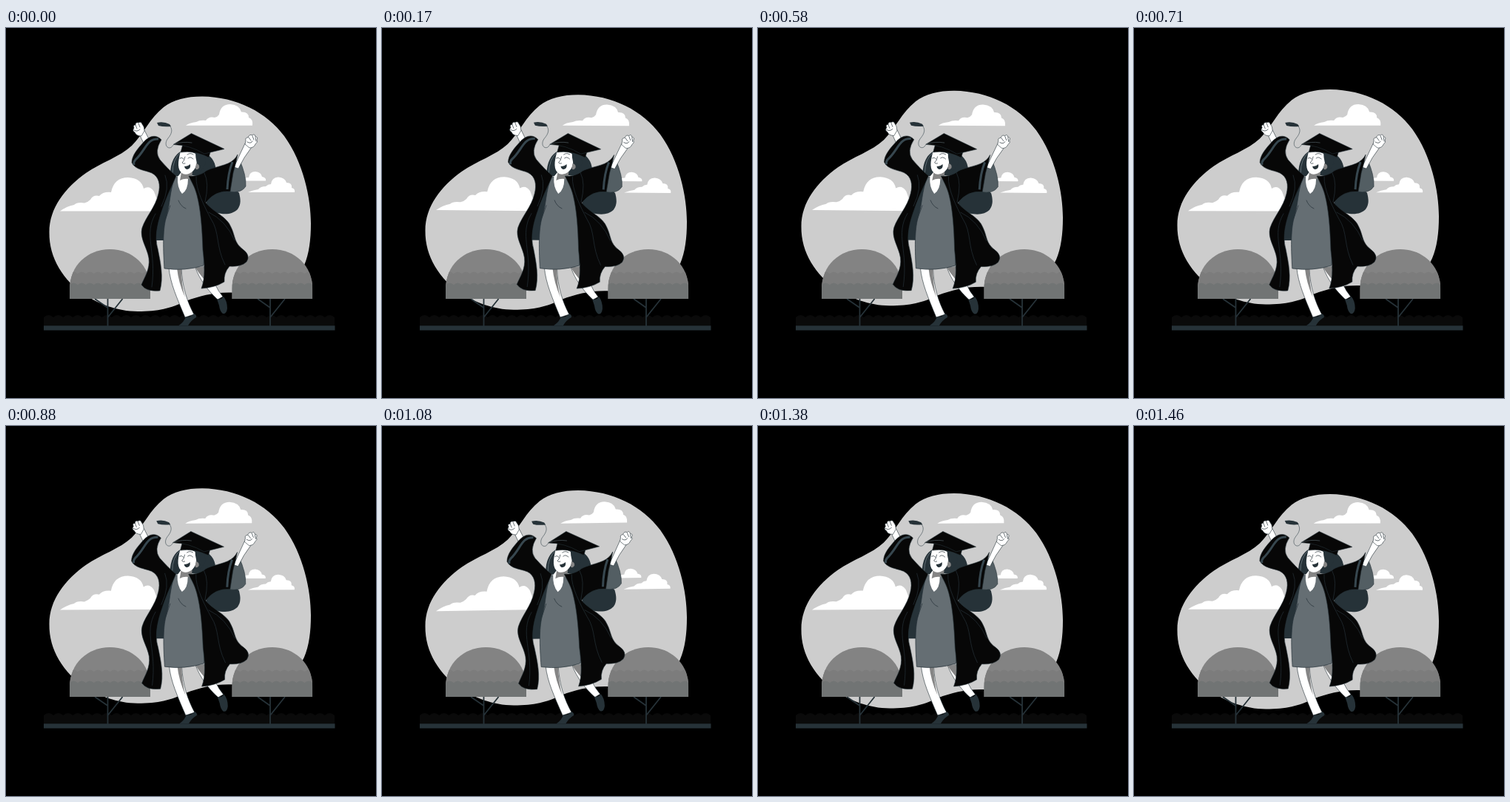
These frames come from a looping animation (500x500 px, 1500 ms). An HTML page:

```html
<!DOCTYPE html>
<html lang="en">
<head>
<meta charset="utf-8">
<title>Graduation jump</title>
<style>
html, body { margin: 0; height: 100%; overflow: hidden; background: #000; }
svg { display: block; width: 100vw; height: 100vh; }
.ink { fill: #263238; }
.gown { fill: #070707; stroke: #263238; stroke-width: .6; }
.line { fill: none; stroke: #263238; stroke-width: .7; stroke-linecap: round; stroke-linejoin: round; }
.skin { fill: #fff; stroke: #263238; stroke-width: .6; stroke-linejoin: round; }
.shade { fill: #858585; }
.trim { fill: none; stroke: #37474f; stroke-width: 3; }
</style>
</head>
<body>
<svg viewBox="0 0 500 500">
  <defs>
    <clipPath id="dome"><path d="M86 366V353C86 321 110 299 140.500 299S195 321 195 353V366Z"/></clipPath>
    <g id="crown" clip-path="url(#dome)">
      <path fill="#838383" d="M86 299H195V366H86Z"/>
      <path id="band1" fill="#7c7c7c"/>
      <path id="band2" fill="#717474"/>
    </g>
  </defs>

  <path id="blob" fill="#cdcdcd" d="M265 92.500C312 93 352 114 376 146C402 182 412 230 412 264C412 309 402 340 370 354C343 361 322 357.500 304 357.500C280 357 262 362 243 369C222 379 206 383 178 383C150 383 124 372 107 361C78 342 58 311 58.500 276C58.500 243 80 216 108 196C128 182 154 174 170 159C186 143 194 122 213 107C226 97 244 92.500 265 92.500Z"/>

  <g class="sway" fill="#fff">
    <path d="M243 131.700Q248 128 257 127Q262 124 270 125Q274 119 282 121Q286 120 288 117Q290 103 303 103Q316 104 318 113.500Q328 113 328 121Q334 123 333 131.700Z"/>
    <path d="M73 247.500Q82 241 92 239Q96 235 106 236.500Q111 235 114 232Q118 225 126 227Q131 221 142 222Q146 202 165 202Q183 203 186 217Q194 212 200 221L210 247.500Z"/>
    <path d="M327 222Q334 219 341 218Q344 214 351 214Q354 211 358 211Q359 202 368 201.500Q377 202 379 209Q387 209 386 216Q391 217 390 222Z"/>
    <path d="M318 206.500Q322 202 328 202Q329 194 337 194Q345 195 346 201Q352 202 351 206.500Z"/>
  </g>

  <path id="hedge" fill="#0a0a0a"/>
  <path class="ink" d="M51 402.300H444.500V408.600H51Z"/>
  <path fill="none" stroke="#263238" stroke-width="1.800" d="M137.500 366V403M120 366L137.500 378M157.500 366L137.500 391M357 366V403M340 366L357 378M377 366L357 391"/>
  <use href="#crown"/>
  <use href="#crown" x="219.300"/>

  <g class="sway">
    <!-- hair and lining behind the body -->
    <path class="ink" d="M238 166C228 170 222 182 222 198Q231 203 240 198L264 200C276 199 285 197 283 187C281 176 273 170 262 165Z"/>
    <path class="ink" d="M272 224C288 216 312 217 315 223C317 231 318 238 313 245C304 254 288 253 270 244Z"/>
    <path class="line" style="stroke:#78858b" d="M236 168Q225 177 225 196"/>
    <path class="ink" d="M228 203L208 243L200 287H215L228 235Z"/>

    <!-- legs -->
    <path class="skin" d="M256 324C262 340 272 354 286 367L293 363Q281 349 274 322Z"/>
    <path class="shade" d="M256 324Q264 337 278 350L281 348L272 322Z"/>
    <path class="ink" d="M285 366Q290 368 294 363Q299 369 299 379Q298 387 293 386Q289 383 288 375Z"/>
    <path class="skin" d="M220 324C222 345 231 365 242 391L254 387C245 370 238 350 237 324Z"/>
    <path class="shade" d="M231 324Q233 344 242 364Q237 347 237 324Z"/>
    <path class="ink" d="M233 402.300Q241 397 243 390Q249 392 254 386Q258 388 257 391Q250 395 246 402.300Z"/>

    <!-- dress, neck and chest -->
    <path fill="#656e73" stroke="#263238" stroke-width=".7" d="M228 202C221 222 222 237 217 254C212 270 212 293 214 325Q241 329 267 321L270 270L262 230L251 200Z"/>
    <path fill="#fff" d="M232 201L239 192L249 194L246 204Q246 219 238 224Q231 216 232 201Z"/>
    <path class="shade" d="M237 195Q243 200 252 193L251 205Q242 202 235 206Z"/>
    <path class="line" d="M233 233Q236 241 243 244M222 240Q218 252 214 262"/>

    <!-- arms -->
    <path class="skin" d="M180 143L187 158L196 156L187 138Z"/>
    <path class="skin" d="M173 135Q171 131 175 131Q175 127 179 128Q183 126 184 130Q187 133 187 139L183 146Q176 146 174 141Q170 139 173 135Z"/>
    <path class="line" d="M175 131L177 136M179 129L181 134M173 138Q177 141 181 137"/>
    <path fill="#535e63" stroke="#263238" stroke-width=".6" d="M315 177Q325 199 324 214Q318 224 301 221L305 186Z"/>
    <path class="skin" d="M323 156L308 188L314 190Q321 175 332 161Z"/>
    <path class="skin" d="M324 152Q323 148 327 148Q329 143 333 145Q336 142 337 147Q341 147 339 151Q341 154 337 157Q335 162 329 162L323 157Z"/>
    <path class="line" d="M328 148L331 152M333 146L335 151M337 148L338 153M326 154Q331 157 333 153"/>

    <!-- gown -->
    <path class="gown" d="M210 151C201 142 192 148 187 153C178 163 170 172 170 182C175 192 188 192 197 196C207 201 209 212 206 224C202 242 189 255 184 270C180 284 191 297 193 311C195 326 187 337 183 347Q190 357 208 355C213 337 209 318 205 298C200 281 206 260 211 246C217 228 224 214 230 200Q219 191 208 178Q200 167 210 151Z"/>
    <path class="trim" d="M206 150C190 149 189 165 175 178Q172 181 173 185"/>
    <path class="line" d="M215 199Q222 216 210 241M202 251C185 280 204 301 197 350"/>
    <path class="gown" d="M247 200Q258 201 268 195C272 190 288 188 300 183Q309 179 313 171Q311 181 307 196L303 221Q283 219 270 236C279 248 299 255 304 269C310 281 308 290 320 299Q331 307 325 316Q318 323 302 322Q294 331 295 343Q282 351 264 352C270 337 268 318 266 300C265 270 263 245 258 226C255 214 250 207 247 200Z"/>
    <path class="trim" d="M306 181Q300 196 299 218"/>
    <path class="line" d="M257 201C256 218 268 241 277 258C289 276 283 294 296 320M268 196Q275 209 269 235M274 249Q297 260 309 287"/>

    <!-- head -->
    <path fill="#fff" d="M236 167C232 181 231 192 239 197C247 200 257 193 258 181L259 172Q249 164 236 167Z"/>
    <path class="ink" d="M256 168Q256 183 263 194L270 183L268 169Z"/>
    <path class="shade" d="M257 183Q262 184 261 189Q258 193 256 190Z"/>
    <path class="line" d="M242 174Q241 180 238 182Q239 184 242 183M235 176Q238 174 240 177M246 176Q249 173 253 177M245 171Q249 168 253 171"/>
    <path class="ink" d="M241 187Q246 187 249 184Q250 190 245 191Q242 191 241 187Z"/>
    <path class="gown" d="M239 157L236 168Q254 165 274 175L278 161Z"/>
    <path class="gown" d="M226 157.500L250.500 142.500L295 163.500L268 170Q248 158 226 157.500Z"/>
    <path class="line" style="stroke:#4f5c62" d="M251 155Q239 153 227 157C225 159 224 162 221 162C216 162 214 155 219 149C224 143 226 137 221 132"/>
    <path class="ink" d="M204 128Q213 126 221 130L223 133Q213 134 206 132Z"/>
  </g>
</svg>
<script>
const LOOP = 1500;
const $ = id => document.getElementById(id);

function scallop(id, left, right, top, bottom, step, height) {
  const bumps = `q${step / 2} ${-height} ${step} 0`.repeat(Math.ceil((right - left) / step));
  $(id).setAttribute('d', `M${left} ${bottom}V${top}${bumps}V${bottom}Z`);
}
scallop('band1', 86, 195, 332, 366, 10.9, 5);
scallop('band2', 86, 195, 347, 366, 10.9, 5);
scallop('hedge', 51, 444, 391, 402.3, 13.1, 6);

const swaying = document.querySelectorAll('.sway');
const start = performance.now();

function draw(now) {
  const p = Math.max(0, now - start) % LOOP / LOOP;
  const lift = -10 * (1 - Math.abs(1 - 2 * p));
  const angle = p < .25 ? 4 * p : p < .75 ? 2 - 4 * p : 4 * p - 4;
  $('blob').setAttribute('transform', `translate(0 ${lift})`);
  for (const part of swaying) part.setAttribute('transform', `rotate(${angle} 250 250)`);
  requestAnimationFrame(draw);
}
draw(start);
</script>
</body>
</html>
```
